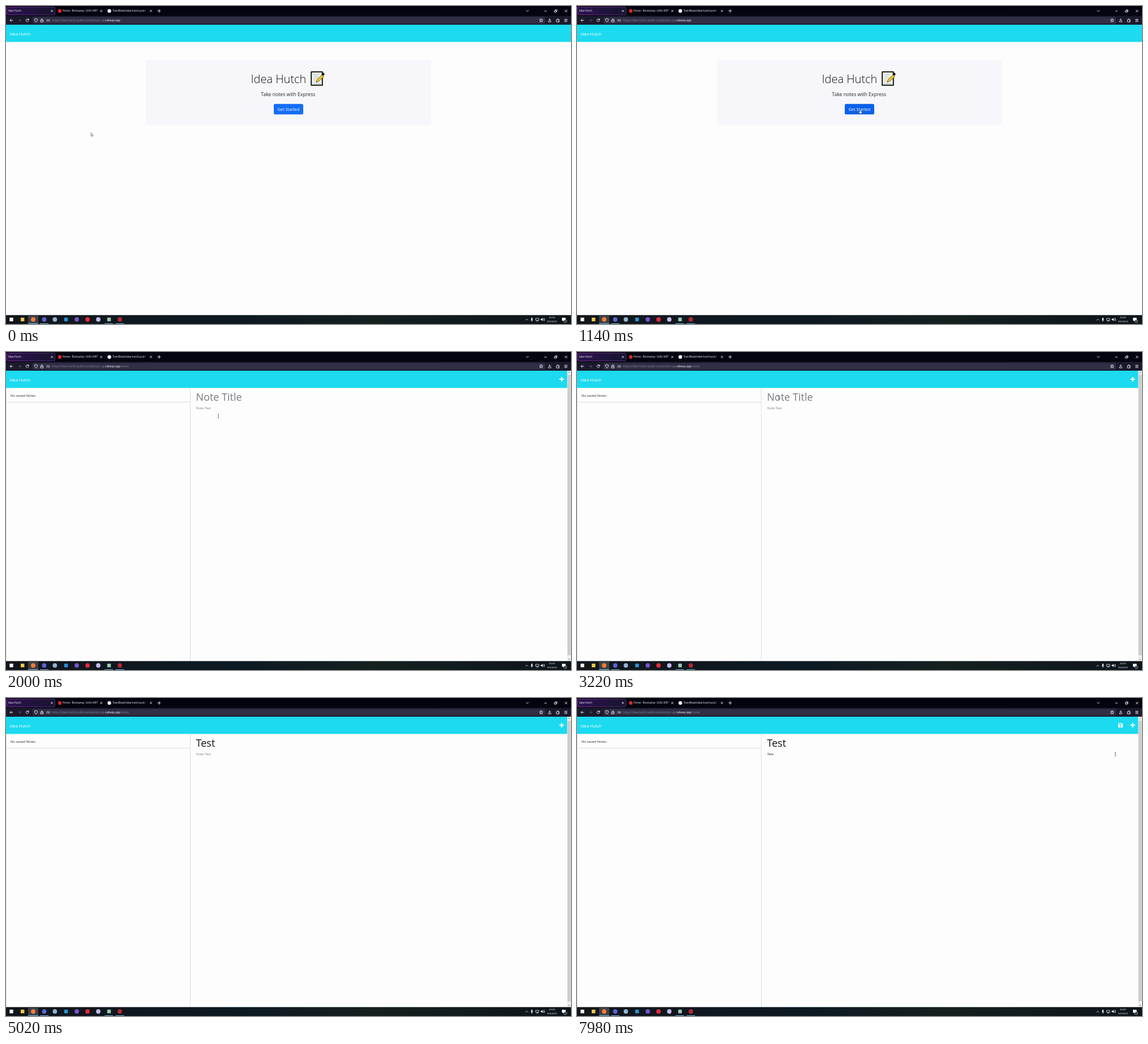
Animation, 998 px wide and 561 px high, one loop 8000 ms. Source, as an HTML page:

```html
<!DOCTYPE html>
<html lang="en">
<head>
<meta charset="utf-8">
<title>Idea Hutch</title>
<style>
  html, body { margin: 0; width: 100%; height: 100%; overflow: hidden; background: #fdfdfd; }
  svg { display: block; width: 100vw; height: 100vh; }
  text { font-family: "Open Sans", "Noto Sans", sans-serif; white-space: pre; }
  .line { fill: none; stroke: #f0f0f6; stroke-width: .9; stroke-linecap: round; stroke-linejoin: round; }
  .dim { stroke: #55546a; }
  .tab { font-size: 4.5px; fill: #f4f4f8; }
  .clock { font-size: 4.25px; fill: #fff; text-anchor: middle; }
</style>
</head>
<body>
<svg viewBox="0 0 998 561" preserveAspectRatio="none">
  <defs>
    <linearGradient id="tabFill" x2="1">
      <stop stop-color="#2c1250"/><stop offset="1" stop-color="#17142e"/>
    </linearGradient>
    <linearGradient id="tabEdge" x2="1">
      <stop stop-color="#85309c"/><stop offset="1" stop-color="#533080"/>
    </linearGradient>
    <linearGradient id="bar" x2="1">
      <stop stop-color="#12161a"/><stop offset=".4" stop-color="#0d1922"/>
      <stop offset=".65" stop-color="#15201f"/><stop offset="1" stop-color="#0d141a"/>
    </linearGradient>
    <linearGradient id="fade" x1="241" x2="251" gradientUnits="userSpaceOnUse">
      <stop stop-color="#f4f4f8"/><stop offset="1" stop-color="#f4f4f8" stop-opacity="0"/>
    </linearGradient>
  </defs>

  <rect width="998" height="561" fill="#fdfdfd"/>

  <!-- Browser tabs -->
  <rect width="998" height="18" fill="#03040f"/>
  <rect x="1" y="2" width="85.5" height="13.6" rx="1.5" fill="url(#tabFill)" stroke="url(#tabEdge)" stroke-width=".9"/>
  <circle id="spinner" cx="7" cy="8.7" r="4" fill="#7d1c94"/>
  <text id="tabTitle" class="tab" x="4" y="10.4">Idea Hutch</text>
  <circle cx="95" cy="8.7" r="3.2" fill="#d8262c"/>
  <text class="tab" x="100" y="10.4">Home - Bootcamp: UofU-VIRT</text>
  <circle cx="182.5" cy="8.7" r="3.2" fill="#f4f4f8"/>
  <text class="tab" x="188" y="10.4" style="fill:url(#fade)">TovinBrask/idea-hutch-publi</text>
  <path class="line" d="M79.5 7.2l3 3m0-3l-3 3M166.8 7.2l3 3m0-3l-3 3M254.5 7.2l3 3m0-3l-3 3M268 8.7h5m-2.500-2.500v5
    M919 7.800l2 2 2-2M951.200 9h3.600M987.500 7l3.600 3.600m0-3.600l-3.600 3.600M969 8h3v3h-3zM970.200 7.800v-1h3v3h-1"/>

  <!-- Toolbar -->
  <rect y="17.500" width="998" height="15.500" fill="#1b1a2d"/>
  <rect x="47" y="19.300" width="905" height="11.800" rx="2" fill="#302f45"/>
  <path class="line" d="M12 25.300h-5l2.200-2.200M7 25.300l2.200 2.200M39.800 24a2.500 2.500 0 1 0 .2 2M40 22.500v2h-2
    M53 22.300l2.500 1q0 3.700-2.500 5-2.500-1.300-2.500-5zM61.500 25h4v3h-4zM62.300 25v-1.300a1.200 1.200 0 0 1 2.400 0v1.300
    M72 24.200h2m1.500 0h1.500M72 26.400h1.200m1.400 0h2.400
    M945.200 22.300l.9 1.900 2.100.2-1.600 1.500.5 2.100-1.900-1.100-1.900 1.100.5-2.100-1.600-1.500 2.100-.2z
    M960.300 22.300v3.500m-1.600-1.500l1.600 1.600 1.600-1.600M958 26.700v1.300h4.600v-1.300
    M972.700 24h1.500v-1.300h1.400v1.300h1.500v1.500h-1.200v1.200h1.200v1.500h-4.400z
    M986.700 23.300h4.400m-4.400 2h4.400m-4.400 2h4.400"/>
  <path class="line dim" d="M21.500 25.300h5l-2.200-2.200M26.500 25.300l-2.200 2.200"/>
  <text x="81" y="27.200" font-size="5.040" fill="#85849a">https://idea-hutch-public-production.up.<tspan fill="#fff">railway.app</tspan><tspan id="route">/notes</tspan></text>

  <!-- Site header -->
  <rect y="33" width="998" height="30.400" fill="#1cdaef"/>
  <text x="6.400" y="51.600" font-size="7.250" fill="#fff">Idea Hutch</text>

  <g id="landing">
    <rect x="247" y="95" width="504" height="114.700" fill="#f7f7fb"/>
    <text x="432.500" y="135.500" font-size="20" font-weight="300" fill="#111">Idea Hutch</text>
    <g stroke-linejoin="round">
      <path d="M539.200 116.200h19.600v23.600h-19.600z" fill="#f8f8f2" stroke="#15180f" stroke-width="2"/>
      <path d="M542.500 120.500h11m-11 3.300h10m-10 3.300h9m-9 3.300h5m-5 3.300h3m-3 3.300h13" stroke="#a2b5b4"/>
      <path d="M547.500 134.500l2-4.500 9-9 3 3-9 9z" fill="#f4c928" stroke="#33301c" stroke-width=".8"/>
      <path d="M557.500 120.500l2.800-2.700 2.300 2.300-2.700 2.800z" fill="#15180f" stroke="#15180f"/>
    </g>
    <text x="450.300" y="158.500" font-size="8.660" fill="#222529">Take notes with Express</text>
    <rect id="button" x="473" y="172.800" width="52" height="18.500" rx="2.600"/>
    <text x="479.500" y="185.200" font-size="7.370" fill="#fff">Get Started</text>
  </g>

  <g id="notes">
    <path d="M325.500 63.500V545M.4 63.500V545" stroke="#d5d6d8" stroke-width=".8"/>
    <g id="list">
      <path d="M1 88.500H325" stroke="#d5d6d8" stroke-width=".8"/>
      <text x="8" y="78.700" font-size="6" fill="#222529">No saved Notes</text>
    </g>
    <text id="noteTitle" x="335.500" y="86" font-size="18"></text>
    <text id="noteText" x="336" y="101.300" font-size="5.900"></text>
    <path d="M981.500 44v8m-4-4h8" stroke="#fff" stroke-width="2"/>
    <g id="save">
      <path d="M956 44h6.300l1.900 1.900v6.100h-8.200z" fill="#fff"/>
      <path d="M957.200 45.200h4.500v2h-4.500z" fill="#1cdaef"/>
      <circle cx="960" cy="49.700" r="1.200" fill="#1cdaef"/>
    </g>
    <rect x="991.300" y="33" width="6.700" height="512.500" fill="#f0f0f0"/>
    <rect x="991.800" y="40" width="5.800" height="495" fill="#cdcdcd"/>
    <path d="M993 37.200l1.700-1.700 1.700 1.700M993 541.300l1.700 1.700 1.700-1.700" fill="none" stroke="#555" stroke-width=".8"/>
  </g>

  <!-- Taskbar -->
  <rect y="545.300" width="998" height="15.700" fill="url(#bar)"/>
  <rect x="39" y="545.300" width="18" height="15.700" fill="#3a4146"/>
  <g id="apps"></g>
  <path d="M39 560.400h18M60 560.400h15M174 560.400h15M193.500 560.400h15" stroke="#76b9ed" stroke-width="1"/>
  <path class="line" d="M918 554.300l2-2 2 2M936 551h5v3.500h-5zM937.200 556h2.600M949.200 551.600q1.200 1.500 0 3M950.600 550.600q2 2.500 0 5
    M927.300 553.300q0 1.700 1.600 1.700t1.600-1.700M928.900 555v1.500" style="stroke-width:.8"/>
  <rect x="927.900" y="549.800" width="2" height="4.200" rx="1" fill="#fff"/>
  <path d="M944.500 552h1.300l2-1.700v5.500l-2-1.700h-1.300z" fill="#fff"/>
  <path d="M982 550h6.500v5h-3l-1.500 1.500v-1.500h-2z" fill="#fff"/>
  <circle cx="988" cy="556" r="2.600" fill="#12181d" stroke="#fff" stroke-width=".5"/>
  <text x="988" y="557.300" font-size="3.500" fill="#fff" text-anchor="middle">3</text>
  <text id="time" class="clock" x="964.500" y="551.300"></text>
  <text class="clock" x="964.500" y="558.400">9/6/2023</text>

  <g id="cursor">
    <path id="arrow" d="M0 0v6l1.400-1.300 1 2.200 1-.5-1-2.100h1.800z" fill="#fff" stroke="#444" stroke-width=".6"/>
    <path id="hand" d="M-.7 0q.7-.8 1.300 0v2.400l2 .6q.7.300.5 1.300l-.5 2.500h-3.200l-1.900-2.700q.3-.9 1.300-.2l.5.500z" fill="#fff" stroke="#333" stroke-width=".5"/>
    <path id="ibeam" d="M-1.100-3h2.200M0-3v6M-1.100 3h2.200" fill="none" stroke="#444" stroke-width=".75"/>
  </g>
</svg>
<script>
  const LOOP = 8000, OPEN = 1300, LOADED = 1680;
  const TITLE_KEYS = [3900, 4300, 4650, 4960];
  const TEXT_KEYS = [6300, 6650, 6980, 7300];
  const HIDE = TITLE_KEYS[0], SHOW = 7480, MINUTE = 7440;

  // Pointer stops: time, x, y
  const PATH = [
    [0, 150, 223.500], [260, 150, 223.500], [980, 500, 183], [1260, 500, 183],
    [1460, 422, 194], [2300, 356, 80], [7480, 356, 80], [7900, 951, 99], [LOOP, 951, 99]
  ];

  const el = Object.fromEntries([...document.querySelectorAll("[id]")].map(e => [e.id, e]));
  const show = (e, on) => e.style.display = on ? "" : "none";
  const smooth = u => u * u * (3 - 2 * u);

  // Taskbar app marks: x, colour, shape
  el.apps.innerHTML = [
    [9.5, "#f4f6f8", "square"], [29.2, "#f5c649", "square"], [48, "#ff7839", "circle"],
    [67.5, "#5865d8", "circle"], [86.3, "#8fb4d4", "circle"], [106, "#2495db", "square"],
    [125, "#7654cf", "circle"], [144, "#e42b3d", "circle"], [163, "#c4b9ee", "circle"],
    [182, "#9bc9b6", "square"], [201, "#b52834", "circle"]
  ].map(([x, color, shape]) => shape === "circle"
    ? `<circle cx="${x}" cy="553" r="3.900" fill="${color}"/>`
    : `<rect x="${x - 3.2}" y="549.800" width="6.400" height="6.400" fill="${color}"/>`).join("");

  function pointerAt(t) {
    const i = PATH.findIndex(p => p[0] > t);
    const [t0, x0, y0] = PATH[i - 1], [t1, x1, y1] = PATH[i];
    const u = smooth((t - t0) / (t1 - t0));
    return [x0 + (x1 - x0) * u, y0 + (y1 - y0) * u];
  }

  function typeInto(field, keys, t, placeholder) {
    const count = keys.filter(k => t >= k).length;
    field.textContent = count ? "Test".slice(0, count) : placeholder;
    field.setAttribute("fill", count ? "#111" : "#777b80");
  }

  function render(t) {
    const onNotes = t >= OPEN, loading = onNotes && t < LOADED;
    const [x, y] = pointerAt(t);
    const hover = !onNotes && x > 473 && x < 525 && y > 173 && y < 191;

    show(el.landing, !onNotes);
    show(el.notes, onNotes);
    show(el.route, onNotes);
    show(el.spinner, loading);
    el.tabTitle.setAttribute("x", loading ? 12 : 4);
    show(el.list, t >= LOADED);
    el.button.setAttribute("fill", hover ? "#0b61e8" : "#146ef6");

    typeInto(el.noteTitle, TITLE_KEYS, t, "Note Title");
    typeInto(el.noteText, TEXT_KEYS, t, "Note Text");
    show(el.save, t >= TEXT_KEYS[0]);
    el.time.textContent = t < MINUTE ? "20:05" : "20:06";

    show(el.cursor, t < HIDE || t >= SHOW);
    show(el.arrow, !onNotes && !hover);
    show(el.hand, hover);
    show(el.ibeam, onNotes);
    el.cursor.setAttribute("transform", `translate(${x} ${y})`);
  }

  const start = performance.now();
  (function frame() {
    render((performance.now() - start) % LOOP);
    requestAnimationFrame(frame);
  })();
</script>
</body>
</html>
```
